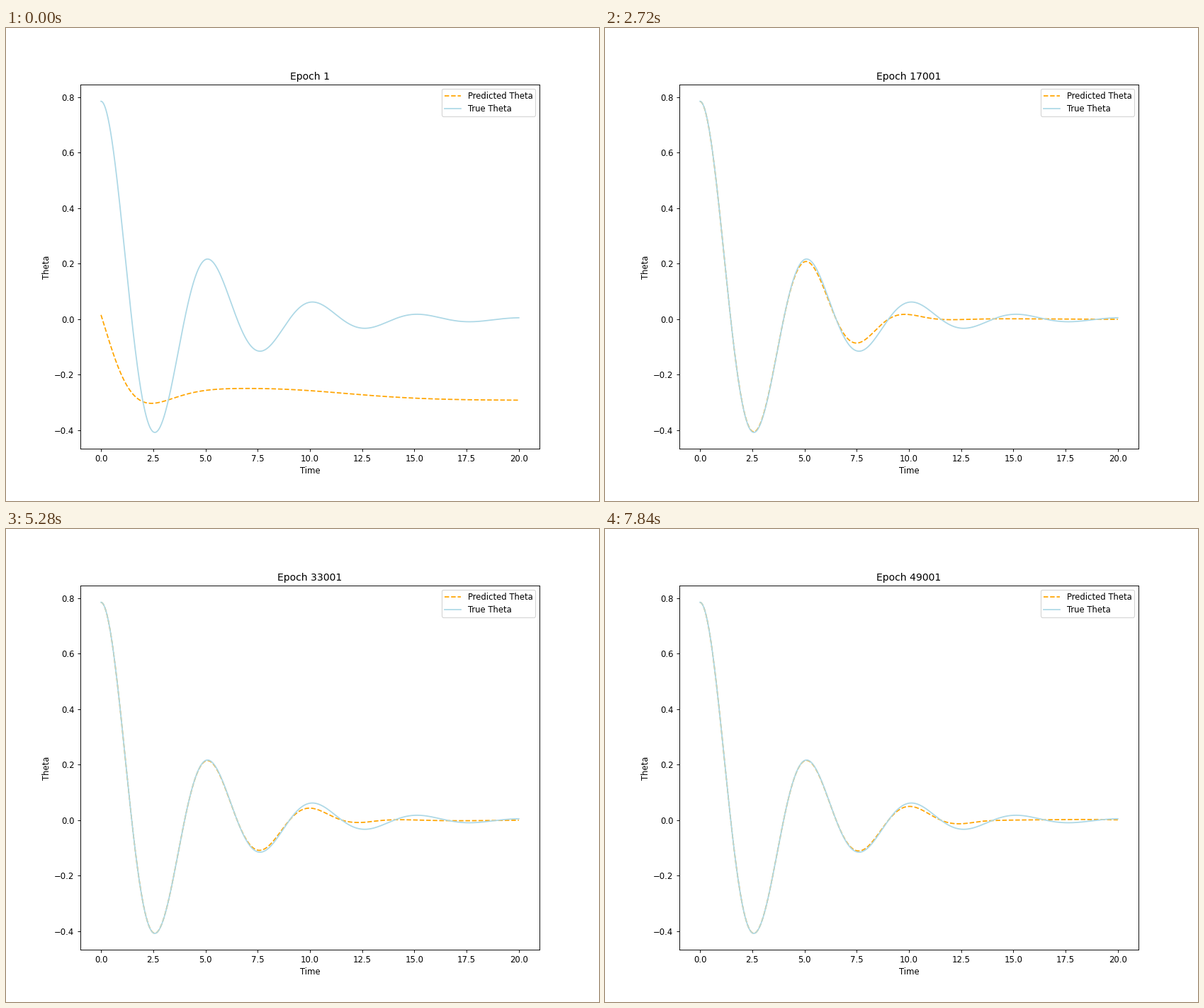
Recreate the animation shown at these times as a matplotlib script. Size 837 by 669 pixels, loop 8 s.

```python
import numpy as np
import matplotlib.pyplot as plt
from matplotlib.animation import FuncAnimation

W, H, DPI = 837, 669, 83.7
FRAMES, STEP_MS = 50, 160
DAMPING, STIFFNESS = 0.5, 1.635
OMEGA = np.sqrt(STIFFNESS - DAMPING**2 / 4)

t = np.linspace(0, 20, 1001)


def pendulum(ts):
    """Damped pendulum released at 45 degrees, integrated with RK4."""
    def rate(s):
        return np.array([s[1], -DAMPING * s[1] - STIFFNESS * np.sin(s[0])])

    h = ts[1] - ts[0]
    s = np.array([np.pi / 4, 0.0])
    out = [s[0]]
    for _ in ts[1:]:
        a = rate(s)
        b = rate(s + h / 2 * a)
        c = rate(s + h / 2 * b)
        d = rate(s + h * c)
        s = s + h / 6 * (a + 2 * b + 2 * c + d)
        out.append(s[0])
    return np.array(out)


true = pendulum(t)

# Output of the untrained network: a quick drop, then a broad low hump
untrained = (-0.2925 + 0.042 * np.exp(-((t - 7.5) / 5.75)**2)
             + 0.3 * np.exp(-0.8 * t) * np.cos(0.97 * t))


def ripple(lag):
    """Ever slower oscillation that sets in behind the learned range."""
    phase = 3.5 * np.log(np.maximum(lag, 0.1) / 2.4)
    return np.cos(np.maximum(phase, -np.pi / 2))


def predicted(k):
    """Network output after k thousand epochs."""
    horizon = 12.4 - 10.7 * np.exp(-k / 15.5)
    width = 1.1 + 0.005 * k
    learned = 1 / (1 + np.exp((t - horizon) / width))
    size = 0.036 * np.exp(-0.174 * horizon) * np.cos(OMEGA * (horizon - 10.2))
    fit = learned * true + size * (1 - learned)**2 * ripple(t - horizon)
    naive = np.exp(-1.2 * k)
    return naive * untrained + (1 - naive) * fit


fig, ax = plt.subplots(figsize=((W + 0.01) / DPI, (H + 0.01) / DPI), dpi=DPI)


def draw(k):
    ax.clear()
    ax.plot(t, predicted(k), "--", color="orange", label="Predicted Theta")
    ax.plot(t, true, color="lightblue", label="True Theta")
    ax.set_title(f"Epoch {1000 * k + 1}")
    ax.set_xlabel("Time")
    ax.set_ylabel("Theta")
    ax.tick_params(axis="x", pad=2.8)
    ax.legend(loc="upper right", labelspacing=0.37, borderpad=0.36)
    return ax.get_children()


anim = FuncAnimation(fig, draw, frames=FRAMES, interval=STEP_MS,
                     init_func=lambda: draw(0), repeat=True, repeat_delay=0)
plt.show()
```
